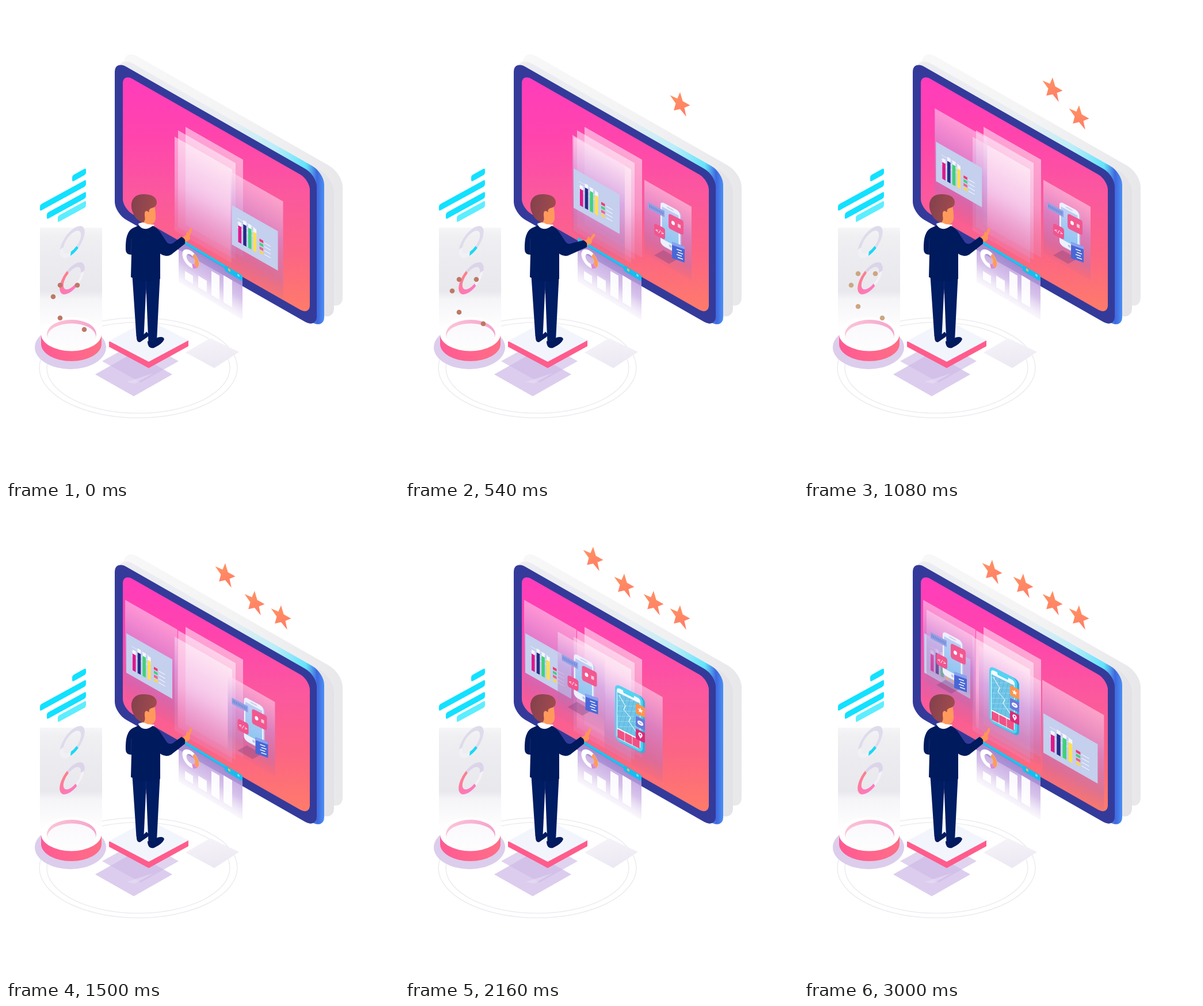
An HTML page with a canvas for the animation above (3030 ms loop, 683 px wide and 820 px high).

```html
<!DOCTYPE html>
<html lang="en">
<head>
<meta charset="utf-8">
<title>Interactive display</title>
<style>
html, body { margin: 0; width: 100%; height: 100%; overflow: hidden; background: #fff; }
canvas { display: block; width: 683px; height: 820px; }
</style>
</head>
<body>
<canvas id="stage" width="683" height="820"></canvas>
<script>
const c = document.getElementById('stage').getContext('2d');
const LOOP = 3030, ISO = 0.57, NAVY = '#001a5e';
const clamp = v => Math.max(0, Math.min(1, v));
const mix = (a, b, u) => a + (b - a) * u;
const smooth = u => u * u * (3 - 2 * u);
const ramp = (t, a, b) => smooth(clamp((t - a) / (b - a)));
const easeIn = u => u * u;
const easeOut = u => 1 - (1 - u) * (1 - u);

// keys: [time, x, y, easing into this key]
function along(keys, t) {
  if (t <= keys[0][0]) return keys[0].slice(1, 3);
  for (let i = 1; i < keys.length; i++) {
    const [t1, x1, y1, ease = smooth] = keys[i];
    const [t0, x0, y0] = keys[i - 1];
    if (t < t1) {
      const u = ease((t - t0) / (t1 - t0));
      return [mix(x0, x1, u), mix(y0, y1, u)];
    }
  }
  return keys[keys.length - 1].slice(1, 3);
}

function grad(x0, y0, x1, y1, ...cols) {
  const g = c.createLinearGradient(x0, y0, x1, y1);
  cols.forEach((s, i) => Array.isArray(s) ? g.addColorStop(s[0], s[1]) : g.addColorStop(i / (cols.length - 1), s));
  return g;
}

// run fn in a plane whose rows lean by k, with its corner at x, y
function plane(x, y, k, fn, sx = 1, sy = 1) {
  c.save();
  c.transform(sx, k * sx, 0, sy, x, y);
  fn();
  c.restore();
}

function box(x, y, w, h, fill, r = 0) {
  c.beginPath();
  c.roundRect(x, y, w, h, r);
  c.fillStyle = fill;
  c.fill();
}

function poly(fill, ...p) {
  c.beginPath();
  for (let i = 0; i < p.length; i += 2) c.lineTo(p[i], p[i + 1]);
  c.closePath();
  c.fillStyle = fill;
  c.fill();
}

function oval(x, y, rx, ry, fill) {
  c.beginPath();
  c.ellipse(x, y, rx, ry, 0, 0, 7);
  c.fillStyle = fill;
  c.fill();
}

function line(col, w, ...p) {
  c.beginPath();
  for (let i = 0; i < p.length; i += 2) c.lineTo(p[i], p[i + 1]);
  c.strokeStyle = col;
  c.lineWidth = w;
  c.stroke();
}

function arc(r, a, b, col, w) {
  c.beginPath();
  c.arc(0, 0, r, a * Math.PI / 180, b * Math.PI / 180);
  c.strokeStyle = col;
  c.lineWidth = w;
  c.stroke();
}

function shape(fill, d) {
  c.fillStyle = fill;
  c.fill(new Path2D(d));
}

function starPath(r) {
  c.beginPath();
  for (let i = 0; i < 10; i++) {
    const q = i % 2 ? r * 0.43 : r, a = i * Math.PI / 5;
    c.lineTo(q * Math.sin(a), -q * Math.cos(a));
  }
  c.closePath();
  c.fill();
}

function star(x, y, start, t) {
  const show = ramp(t, start - 120, start - 50);
  if (!show) return;
  const u = clamp((t - start) / 600);
  c.globalAlpha = show;
  plane(x, y - 28 * Math.sin(Math.PI * u), 0.5, () => {
    c.fillStyle = grad(-14, -16, 12, 16, '#ff9560', '#ff7b69');
    starPath(18.4);
  }, 1, 1.12);
  c.globalAlpha = 1;
}

function floor() {
  c.strokeStyle = '#ececf1';
  c.lineWidth = 1.5;
  for (const [rx, ry] of [[172, 87], [159, 79]]) {
    c.beginPath();
    c.ellipse(230, 628.5, rx, ry, 0, 0, 7);
    c.stroke();
  }
  poly(grad(355, 577, 362, 629, '#f5f3f8', '#ece8f3'), 312, 602, 355, 577, 405, 601, 362, 629);
  poly('#dccdee', 155, 640, 222, 602, 289, 640, 222, 678);
  poly('rgba(208,188,231,.65)', 167, 617, 234, 580, 300, 617, 234, 654);
  poly('rgba(232,222,245,.6)', 210, 653, 256, 638, 224, 656);
  poly('#ff5c8c', 179, 583, 317, 581, 317, 591, 248, 629, 179, 592);
  poly('#f3f5fd', 179, 582, 248, 545, 317, 581, 248, 618);
}

function ring(x, y, base, parts) {
  plane(x, y, -0.8, () => {
    arc(18.5, 0, 360, base, 6.5);
    for (const [a, b, col] of parts) arc(18.5, a, b, col, 6.5);
  });
}

function hologram(t) {
  box(59, 385, 108, 178, grad(0, 385, 0, 563, [0, '#f6f6f8'], [0.08, '#f0f0f3'], [0.3, '#ececf0'], [0.62, '#e9e8ed'], [0.7, '#f5f5f8'], [1, '#fff']));
  ring(115, 410, '#e0dbeb', [[98, 190, '#f1f1f5'], [60, 98, '#18d9f6']]);
  ring(115, 473, '#dcd4e9', [[10, 66, '#f4f2f7'], [68, 246, grad(0, 20, 0, -20, '#ff78bd', '#ff7f86')]]);

  oval(112, 593, 62, 38, '#dccdec');
  const side = grad(61, 0, 166, 0, '#ff5a94', '#ff6e86');
  oval(113.5, 587, 52.5, 30, side);
  box(61, 570, 105, 17, side);
  oval(113.5, 570, 52.5, 29.5, '#fff');
  oval(114, 570, 43, 25, grad(72, 545, 156, 560, '#fbc6d6', '#f5a3cd'));
  oval(114, 574, 42, 22.5, grad(0, 552, 0, 596, '#faf8fc', '#fdfdfe'));

  const gone = 1 - ramp(t, 1080, 1400), warm = ramp(t, 600, 1080);
  if (gone > 0) {
    c.globalAlpha = gone;
    const col = `rgb(${mix(190, 205, warm)},${mix(120, 166, warm)},${mix(102, 128, warm)})`;
    for (const [x, y] of [[94, 485], [124, 485], [82, 505], [94, 542], [136, 562]])
      oval(x, y - t / 54, 4.3, 4.3, col);
    c.globalAlpha = 1;
  }

  for (const [x, y, w] of [[127, 293.5, 24], [99, 329, 80], [105, 346.5, 68], [114.5, 357, 49]])
    plane(x, y, -0.55, () => box(-w / 2, -5.5, w, 11, w === 49 ? '#5ceeff' : '#12e1ff', 3));
}

function tablet() {
  plane(205, 74, ISO, () => box(0, 0, 380, 240, grad(0, 0, 380, 0, '#f8f8f9', '#f4f4f5', '#e8e8eb'), 24));
  plane(196, 86, ISO, () => box(0, 0, 374, 250, grad(0, 0, 374, 0, '#f1f1f3', '#efeff1', '#e3e3e7'), 24));
  plane(201, 89, ISO, () => box(0, 0, 352, 272, grad(0, 0, 352, 0, [0, '#ececf1'], [0.55, '#e8edf2'], [0.76, '#b9eef9'], [0.91, '#62e3fb'], [0.965, '#3f66de'], [1, '#4a90f4']), 21));
  plane(189, 94, ISO, () => box(0, 0, 351, 266, '#343a9a', 20));
}

function sheet(x, y, h) {
  plane(x, y, ISO, () => box(0, 0, 100, h, grad(0, 0, 0, h, 'rgba(255,255,255,.5)', 'rgba(245,222,250,.44)', 'rgba(215,165,225,.2)')));
}

function card(x, y, w, h) {
  plane(x, y, ISO, () => box(0, 0, w, h, grad(0, 0, 0, h, [0, 'rgba(255,220,242,.55)'], [0.42, 'rgba(196,148,222,.58)'], [0.8, 'rgba(180,115,185,.46)'], [1, 'rgba(190,105,150,.12)'])));
}

function chartCard(x, y, sx = 1) {
  card(x - 2, y - 58, 91 * sx, 170);
  plane(x, y, ISO, () => {
    box(0, 0, 80, 68.5, '#c5cfee');
    for (let i = 0; i < 3; i++) box(9, 17 + i * 8, 31, 0.8, 'rgba(255,255,255,.8)');
    const bars = [['#e0188c', 29], ['#252c86', 22], ['#3fd279', 23], ['#ffe04c', 25]];
    bars.forEach(([col, top], i) => {
      box(11 + i * 8.7, top - 7, 5.5, 12, '#f4f6ff');
      box(11 + i * 8.7, top, 5.5, 58 - top, col);
    });
    ['#f3386f', '#3fd279', '#f25f8c', '#f7d84b'].forEach((col, i) => {
      box(48, 31 + i * 6.7, 6.5, 4.5, col);
      box(56.5, 33 + i * 6.7, 11, 1, '#fff');
    });
  }, sx);
}

function appCard(x, y) {
  card(x, y, 82, 128);
  c.save();
  c.translate(x - 415, y - 301);
  poly('rgba(120,60,125,.35)', 432, 432, 448, 423, 474, 438, 458, 447);
  plane(443, 338, 0.54, () => {
    box(2, 1, 34, 75, '#b9c2ee', 6);
    box(0, 0, 34, 75, '#eef0fd', 6);
    box(2.5, 8, 29, 56, grad(0, 8, 0, 64, '#bccdf5', '#8fc6f1'));
    box(11, 3, 12, 2, '#c8cee9', 1);
    oval(17, 69, 2.3, 2.3, '#b9c4e8');
  });
  plane(422, 340, 0.54, () => {
    box(0, 0, 28, 11, '#92a1e5');
    for (let i = 0; i < 9; i++) box(2 + i * 2.8, 3, 1, 5, '#6578cf');
  });
  plane(432, 376, 0.5, () => {
    box(0, 0, 19, 20, '#f1558f', 4);
    c.fillStyle = '#fff';
    c.font = 'bold 8px "DejaVu Sans Mono", monospace';
    c.textAlign = 'center';
    c.fillText('</>', 9.5, 13);
  });
  plane(457, 359, 0.5, () => {
    box(0, 0, 26, 26, '#f25890', 4);
    oval(8, 13, 3, 3.5, '#fff');
    box(16, 10, 5, 6, 'rgba(255,255,255,.65)');
  });
  plane(463, 409, 0.35, () => {
    box(0, 0, 22, 28, '#4967d6');
    box(0, 0, 22, 5, '#8ba2ef');
    for (let i = 0; i < 4; i++) box(8 + i % 2 * 2, 9 + i * 4.5, 9, 1.5, '#fff');
  });
  c.restore();
}

function mapCard(x, y, grow) {
  card(mix(x, x + 1, grow), y, mix(93, 108, grow), 148);
  plane(x + 19, y + 34, 0.5, () => {
    box(3, 0, 49, 98, '#2fb2dc', 8);
    box(0, 0, 48, 97, '#54d3f2', 8);
    box(3, 5, 41, 88, '#f4fbff', 5);
    c.save();
    c.beginPath();
    c.rect(4, 13, 39, 62);
    c.clip();
    box(4, 13, 39, 62, '#6fc4e6');
    for (let i = 0; i < 8; i++) {
      line('#94d5ee', 1, 4, 10 + i * 9, 43, i * 9 - 9);
      line('#57b3da', 0.8, 5 + i * 7, 13, i * 7 - 8, 75);
    }
    line('#e8f8ff', 1.3, 7, 17, 18, 30, 15, 38, 27, 46, 24, 54, 38, 67);
    c.restore();
    for (let i = 0; i < 3; i++) box(4 + i * 13.2, 77, 12.4, 15, '#f05285', 1);
    box(14, 4, 19, 5, '#54d3f2', 2);
    ['#ff944d', '#6978da', '#d92c79'].forEach((col, i) => box(36, 16 + i * 22, 16, 18, col, 2));
    c.save();
    c.translate(44, 25);
    c.fillStyle = '#fff';
    starPath(5);
    c.restore();
    oval(44, 47, 5, 3.7, '#fff');
    box(41.5, 46.5, 5, 1, '#6978da');
    oval(44, 67, 3.6, 3.6, '#fff');
    poly('#fff', 40.7, 68.5, 47.3, 68.5, 44, 74);
    oval(44, 67, 1.3, 1.3, '#d92c79');
  });
}

const pathA = [[0, 393, 346], [450, 293, 282, easeOut], [680, 293, 282], [1270, 209, 221]];
const pathB = [[1350, 416, 302], [1500, 386, 294, easeIn], [1790, 309, 250, easeOut], [1950, 309, 250], [2400, 213, 180]];
const pathC = [[1890, 398, 312], [2400, 303, 243]];

function display(t) {
  c.save();
  plane(203, 117, ISO, () => {
    c.beginPath();
    c.roundRect(0, 0, 325, 235, 17);
  });
  c.fillStyle = grad(0, 120, 0, 535, '#ff3cbc', '#ff44ad', '#fb589e', '#fc6584', '#ff7c68');
  c.fill();
  c.clip();
  sheet(312, 210, 170);
  sheet(299, 216, 168);
  sheet(293, 227, 163);
  const fade = (a, b, fn) => {
    c.globalAlpha = ramp(t, a, b);
    if (c.globalAlpha > 0) fn();
    c.globalAlpha = 1;
  };
  chartCard(...along(pathA, t));
  fade(320, 500, () => appCard(...along(pathB, t)));
  fade(1720, 1870, () => mapCard(...along(pathC, t), ramp(t, 1890, 2400)));
  fade(2200, 2420, () => chartCard(416, 360, 1.18));
  c.restore();
}

function report() {
  plane(300, 402, 0.6, () => {
    box(0, 5, 111, 72, grad(0, 5, 0, 77, [0, 'rgba(184,150,218,.85)'], [0.5, 'rgba(208,184,232,.85)'], [1, 'rgba(240,232,247,.35)']));
    box(0, 0, 111, 5, '#12c9f5');
    box(80, 0, 31, 10, '#16bdf0', 3);
    oval(88, 4, 2.2, 2.2, '#ffb45c');
    oval(104, 3.5, 2, 2, '#65efff');
    [[11, 52, 14], [34, 46, 15], [57, 24, 14], [78, 19, 15]].forEach(([x, y, w]) =>
      box(x, y, w, 66 - y, 'rgba(255,255,255,.93)'));
    c.save();
    c.translate(21, 25);
    arc(11, 0, 360, '#fff', 7);
    arc(11, -65, 35, '#ff9b58', 7);
    arc(11, 35, 75, '#d98bd0', 7);
    c.restore();
  });
}

function man(t) {
  const low = ramp(t, 300, 500) - ramp(t, 650, 850) + ramp(t, 2250, 2430) - ramp(t, 2740, 2960);
  shape('#001c62', 'M219 462 L226.5 574 Q233 580 239.5 573 L243.5 490 L247.5 584 Q254 590 262 582 L268 462Z');
  line('#1c3076', 0.8, 243.5, 476, 243, 500);
  shape(NAVY, 'M227 571 Q236 576 244 566 Q250 570 246 575 L233 584 Q226 585 227 571Z');
  shape(NAVY, 'M246 582 Q256 587 263 576 Q274 573 275 579 Q272 587 257 594 Q246 596 246 582Z');

  // face, hair and collar
  shape('#ff9a5c', 'M239 354 L258 347 Q260 356 260 365 Q261 378 250 380 L249 385 L235 383Z');
  shape(grad(218, 340, 260, 350, '#84414d', '#a04b4d'), 'M218 343 Q221 326 241 327 Q262 328 262 342 Q261 350 253 351 Q247 353 249 358 Q241 353 241 364 Q243 374 238 376 Q225 372 221 360 Q217 352 218 343Z');
  oval(244, 361, 3, 5, '#ff9a5c');
  shape('#fff', 'M230 378 Q239 374 246 379 L258 380 Q254 389 240 388 Q231 386 230 378Z');

  const wx = mix(309, 314, low), wy = mix(406, 412, low);
  const tipX = mix(321.5, 328.5, low), tipY = mix(388, 398, low);
  c.save();
  c.lineCap = 'round';
  line('#ff9658', 10, wx, wy, wx + 6, wy - 3);
  line('#ff9658', 4.5, wx + 7, wy - 4, tipX, tipY);
  line('#ff9658', 3, wx + 5, wy - 5, mix(315, 319, low), mix(394, 402, low));
  c.restore();

  shape(NAVY, 'M231 381 Q240 393 255 382 Q266 386 271 401 L279 419 L268 431 L268 474 Q242 484 217 471 L218 432 Q208 432 208 423 Q207 393 220 386Z');
  shape(NAVY, `M266 390 L280 411 Q285 415 290 412 L${wx - 4} ${wy - 5} Q${wx + 4} ${wy - 2} ${wx + 2} ${wy + 7} L287 432 Q278 437 269 431Z`);
  line('#26346f', 0.7, 218, 404, 217, 430);
}

function frame(now) {
  const t = now % LOOP;
  c.clearRect(0, 0, 683, 820);
  floor();
  hologram(t);
  tablet();
  display(t);
  report();
  star(478, 193, 123, t);
  star(432, 168, 670, t);
  star(381, 138, 1367, t);
  star(327, 114, 1980, t);
  man(t);
  requestAnimationFrame(frame);
}
requestAnimationFrame(frame);
</script>
</body>
</html>
```
